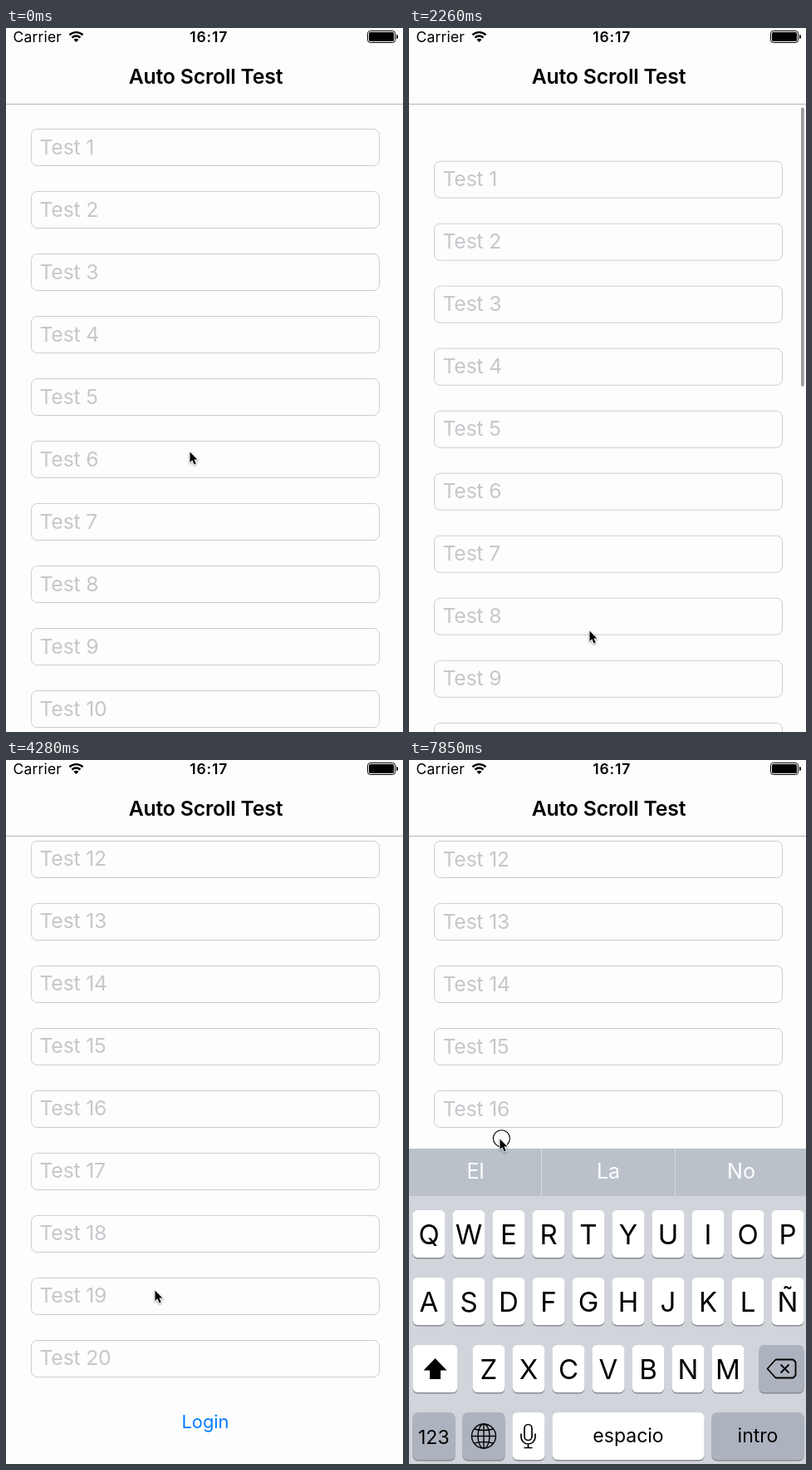
An HTML page with a canvas that plays this animation: 478 by 846 pixels, repeating every 8000 ms.

```html
<!DOCTYPE html>
<html lang="en">
<head>
<meta charset="utf-8">
<title>Auto Scroll Test</title>
<style>
  html, body { margin: 0; width: 100%; height: 100%; overflow: hidden; background: #fdfdfd; }
  canvas { display: block; }
</style>
</head>
<body>
<canvas id="stage" width="478" height="846"></canvas>
<script>
const ctx = document.getElementById('stage').getContext('2d');
const W = 478, H = 846, LOOP = 8000;
const NAV = 92, MAX_SCROLL = 849, VIEW = H - NAV;
const PAGE = '#fdfdfd', GREY_KEY = '#adb3be';

// Pointer keys: time, x, y, optional easing
const flick = p => p ** 1.2;
const smooth = p => p * p * (3 - 2 * p);
const pointerKeys = [
  [0, 221, 509], [50, 221, 509], [270, 221, 597], [430, 221, 597],
  [750, 214, 440], [1010, 237, 308], [1180, 232, 308], [1440, 222, 424],
  [1520, 222, 436], [2010, 217, 724], [2550, 217, 724],
  [2830, 285, 249, flick], [3600, 285, 249], [4280, 179, 637],
  [4720, 164, 715], [5380, 164, 715], [5600, 164, 709],
  [6240, 164, 709], [6310, 164, 706], [6650, 164, 706],
  [6880, 177, 655], [7360, 111, 455], [7540, 111, 455],
  [7550, 109, 455], [LOOP, 109, 455]
];
const presses = [[1520, 2010], [2550, 2830], [4790, 4870], [7380, 7550], [7850, LOOP]];

const clamp = v => Math.max(0, Math.min(1, v));
const ramp = (t, a, b) => clamp((t - a) / (b - a));
const rubber = d => d * 0.55 * VIEW / (d * 0.55 + VIEW);
const settle = x => (1 + x) * Math.exp(-x);

function pointerAt(t) {
  const i = pointerKeys.findIndex(k => k[0] > t);
  const a = pointerKeys[i - 1], b = pointerKeys[i];
  const p = (b[3] || smooth)(ramp(t, a[0], b[0]));
  return { x: a[1] + (b[1] - a[1]) * p, y: a[2] + (b[2] - a[2]) * p };
}

function scrollAt(t, pointer) {
  if (t < 1520) return 0;
  if (t < 2010) return -rubber(Math.max(0, pointer.y - 436));
  const bounce = -rubber(288) * settle((t - 2010) * 0.0098);
  if (t < 2550) return bounce;
  if (t < 2830) return bounce + 724 - pointer.y;
  if (t < 3060) {
    const p = ramp(t, 2830, 3060);
    return bounce + 475 + (MAX_SCROLL - 475) * (1.25 * p - 0.25 * p * p);
  }
  const s = (t - 3060) / 1000;
  return MAX_SCROLL + 1250 * s * Math.exp(-10 * s);
}

function text(str, x, y, size, color, opt = {}) {
  ctx.font = `${opt.weight || 400} ${size}px Inter, Roboto, sans-serif`;
  ctx.letterSpacing = (opt.track || 0) + 'px';
  ctx.textAlign = opt.align || 'center';
  ctx.fillStyle = color;
  ctx.fillText(str, x, y);
}

function box(x, y, w, h, r) {
  ctx.beginPath();
  ctx.roundRect(x, y, w, h, r);
}

function fillBox(x, y, w, h, r, color) {
  box(x, y, w, h, r);
  ctx.fillStyle = color;
  ctx.fill();
}

function poly(points, close = true) {
  ctx.beginPath();
  points.forEach(([x, y]) => ctx.lineTo(x, y));
  if (close) ctx.closePath();
}

function pen(color, width) {
  ctx.strokeStyle = color;
  ctx.lineWidth = width;
}

function drawForm(scroll) {
  for (let i = 0; i < 20; i++) {
    const y = 121 + 75 * i - scroll;
    if (y < 40 || y > H) continue;
    pen('#cdcdcd', 1);
    box(30.5, y + 0.5, 419, 44, 7);
    ctx.stroke();
    text('Test ' + (i + 1), 40.5, y + 30.5, 24.8, '#c7c7cc', { align: 'left', track: -0.2 });
  }
  text('Login', 240, 1652 - scroll, 21.8, '#007aff');
}

function drawScrollbar(t, scroll) {
  const alpha = ramp(t, 1540, 1640) * (1 - ramp(t, 3850, 4150));
  if (!alpha) return;
  const over = Math.max(0, -scroll, scroll - MAX_SCROLL);
  const at = clamp(scroll / MAX_SCROLL);
  const len = 374 - over;
  const y = 95.5 + at * (748 - len);
  fillBox(472, y, 3.8, len, 1.9, `rgba(0,0,0,${0.38 * alpha})`);
}

function drawHeader() {
  ctx.fillStyle = PAGE;
  ctx.fillRect(0, 0, W, NAV - 1);
  ctx.fillStyle = '#b5b5b6';
  ctx.fillRect(0, NAV - 1, W, 1);
  text('Carrier', 8.5, 17, 17.5, '#000', { align: 'left', track: 0.2 });
  text('16:17', 244.2, 17, 17.5, '#000', { weight: 600, track: 0.8 });
  text('Auto Scroll Test', 240.5, 67, 24.8, '#000', { weight: 600, track: -0.2 });

  const a = Math.PI * 0.25;
  pen('#000', 2.4);
  for (const r of [7, 11.4]) {
    ctx.beginPath();
    ctx.arc(84.5, 16.5, r, -Math.PI + a, -a);
    ctx.stroke();
  }
  ctx.beginPath();
  ctx.moveTo(84.5, 17);
  ctx.arc(84.5, 17, 4.2, -Math.PI + a, -a);
  ctx.fillStyle = '#000';
  ctx.fill();

  pen('#000', 1);
  box(435.5, 3.5, 33, 14, 3);
  ctx.stroke();
  fillBox(437, 5, 30, 11, 1.5, '#000');
  fillBox(470, 8, 2, 5, [0, 2, 2, 0], '#000');
}

function key(x, y, w, color = '#fff') {
  fillBox(x, y + 1.5, w, 57, 6, '#888b90');
  fillBox(x, y, w, 57, 6, color);
}

function letters(row, x, y) {
  [...row].forEach((ch, i) => {
    key(x + 48 * i, y, 39);
    text(ch, x + 48 * i + 19.5, y + 40.5, 33, '#000');
  });
}

function drawShift(x, y) {
  poly([[x, y - 13], [x + 14, y + 1.5], [x + 6.5, y + 1.5], [x + 6.5, y + 12],
        [x - 6.5, y + 12], [x - 6.5, y + 1.5], [x - 14, y + 1.5]]);
  ctx.fillStyle = '#000';
  ctx.fill();
}

function drawDelete(x, y) {
  pen('#000', 1.8);
  ctx.lineJoin = 'round';
  poly([[x - 17, y], [x - 7, y - 11], [x + 14, y - 11], [x + 17, y - 8],
        [x + 17, y + 8], [x + 14, y + 11], [x - 7, y + 11]]);
  ctx.stroke();
  for (const d of [-5, 5]) {
    poly([[x - 1, y - d], [x + 9, y + d]], false);
    ctx.stroke();
  }
}

function drawGlobe(x, y) {
  pen('#000', 1.4);
  for (const rx of [14.5, 7]) {
    ctx.beginPath();
    ctx.ellipse(x, y, rx, 14.5, 0, 0, 7);
    ctx.stroke();
  }
  for (const [dx, dy] of [[0, 14.5], [14.5, 0]]) {
    poly([[x - dx, y - dy], [x + dx, y + dy]], false);
    ctx.stroke();
  }
  for (const s of [-1, 1]) {
    ctx.beginPath();
    ctx.moveTo(x - 11.5, y + 8.5 * s);
    ctx.quadraticCurveTo(x, y + 5.5 * s, x + 11.5, y + 8.5 * s);
    ctx.stroke();
  }
}

function drawMic(x, y) {
  pen('#000', 1.7);
  box(x - 4.5, y - 14, 9, 19, 4.5);
  ctx.stroke();
  ctx.beginPath();
  ctx.moveTo(x - 8.5, y - 3);
  ctx.lineTo(x - 8.5, y + 1);
  ctx.arc(x, y + 1, 8.5, Math.PI, 0, true);
  ctx.lineTo(x + 8.5, y - 3);
  ctx.moveTo(x, y + 9.5);
  ctx.lineTo(x, y + 14);
  ctx.moveTo(x - 5, y + 14);
  ctx.lineTo(x + 5, y + 14);
  ctx.stroke();
}

function drawKeyboard(t) {
  if (t < 4900) return;
  const top = 467 + 379 * settle((t - 4900) * 0.012);
  ctx.save();
  ctx.translate(0, top);
  ctx.fillStyle = '#d1d5db';
  ctx.fillRect(0, 0, W, 400);
  ctx.fillStyle = '#bac1c9';
  ctx.fillRect(0, 0, W, 57);
  ctx.fillStyle = '#d6dadf';
  ctx.fillRect(159, 0, 1, 57);
  ctx.fillRect(320, 0, 1, 57);
  ['El', 'La', 'No'].forEach((word, i) => text(word, 80 + 160 * i, 36, 25, '#fff'));

  letters('QWERTYUIOP', 4.5, 74);
  letters('ASDFGHJKLÑ', 4.5, 155);
  letters('ZXCVBNM', 76.5, 236);
  key(4.5, 236, 54);
  drawShift(31.5, 265);
  key(421.5, 236, 54, GREY_KEY);
  drawDelete(448.5, 264.5);

  key(4.5, 317, 51, GREY_KEY);
  text('123', 29.8, 355, 23, '#000');
  key(64.5, 317, 51, GREY_KEY);
  drawGlobe(90, 345.5);
  key(124.5, 317, 39);
  drawMic(143.5, 345.5);
  key(172.5, 317, 183);
  text('espacio', 264, 353, 23, '#000');
  key(364.5, 317, 111, GREY_KEY);
  text('intro', 420, 353, 23, '#000');
  ctx.restore();
}

function drawPointer(t, { x, y }) {
  if (presses.some(([a, b]) => t >= a && t < b)) {
    pen('#000', 1.1);
    ctx.beginPath();
    ctx.arc(x + 2.4, y - 0.3, 10, 0, 7);
    ctx.stroke();
  }
  ctx.save();
  ctx.translate(x + 0.5, y + 0.5);
  poly([[0, 0], [0, 12.4], [2.8, 9.8], [5.1, 15], [7.2, 14.1], [5, 9], [8.9, 9]]);
  ctx.lineJoin = 'round';
  ctx.shadowColor = 'rgba(0,0,0,.4)';
  ctx.shadowBlur = 2.5;
  ctx.shadowOffsetY = 1;
  pen('#fff', 1.8);
  ctx.stroke();
  ctx.shadowColor = 'transparent';
  ctx.fillStyle = '#000';
  ctx.fill();
  ctx.restore();
}

function draw(now) {
  const t = now % LOOP;
  const pointer = pointerAt(t);
  const scroll = scrollAt(t, pointer);
  ctx.fillStyle = PAGE;
  ctx.fillRect(0, 0, W, H);
  drawForm(scroll);
  drawScrollbar(t, scroll);
  drawHeader();
  drawKeyboard(t);
  drawPointer(t, pointer);
}

const start = performance.now();
function tick() {
  draw(performance.now() - start);
  requestAnimationFrame(tick);
}
tick();
</script>
</body>
</html>
```
